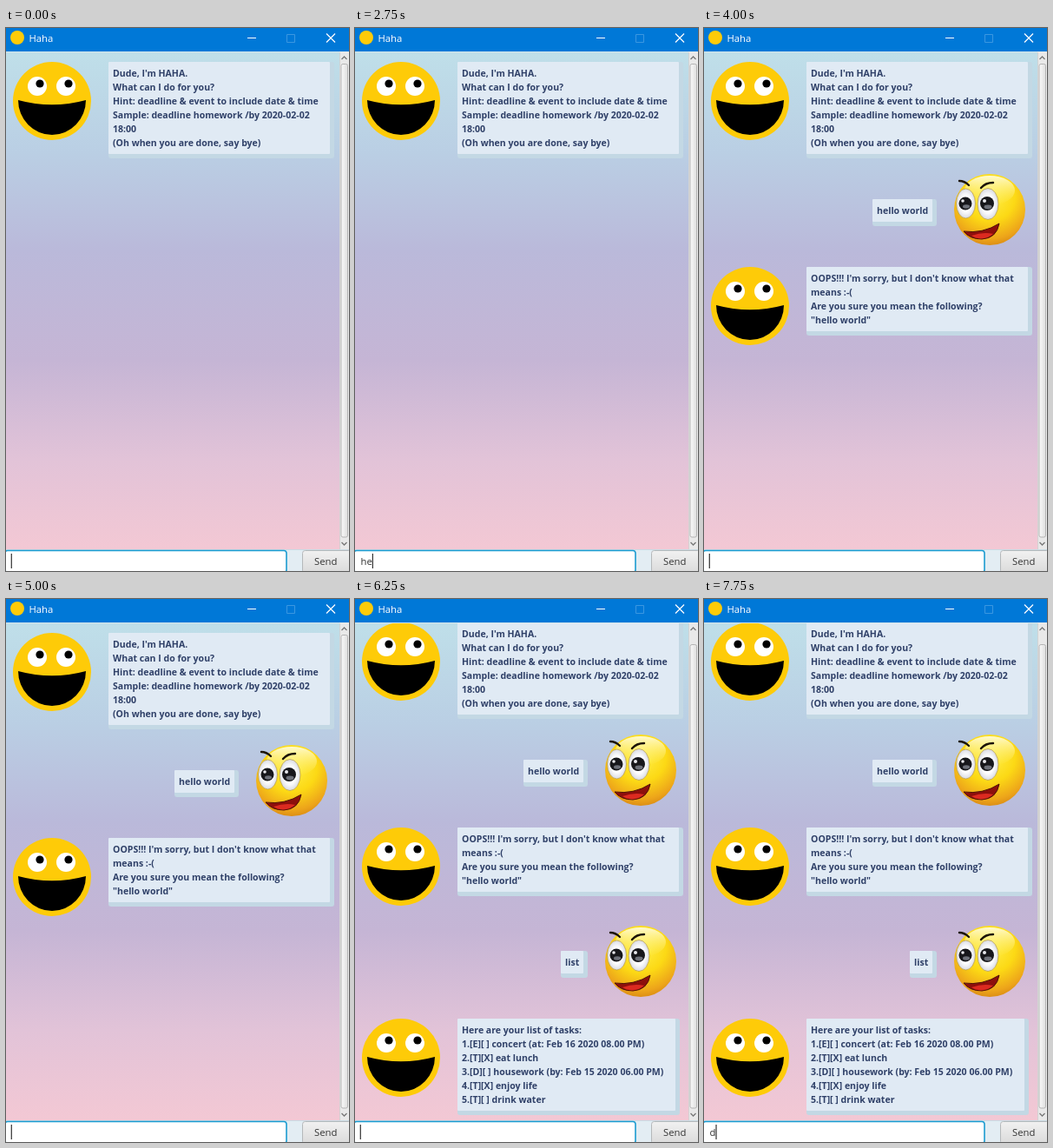
Write an HTML page that moves like this. It is 395 px wide and 625 px high and loops after 8 s.

```html
<!DOCTYPE html>
<html lang="en">
<head>
<meta charset="utf-8">
<title>Haha</title>
<style>
  html, body { margin: 0; width: 100%; height: 100%; overflow: hidden; }
  svg { display: block; width: 395px; height: 625px; }
  text { font: 11.3px "Open Sans", "Noto Sans", sans-serif; white-space: pre; }
  .msg text { font-size: 10.55px; font-weight: 700; fill: #2f4068; }
</style>
</head>
<body>
<svg viewBox="0 0 395 625" xmlns="http://www.w3.org/2000/svg">
  <defs>
    <linearGradient id="sky" x2="0" y2="1">
      <stop offset="0" stop-color="#bfdfe9"/>
      <stop offset=".2" stop-color="#bacfe4"/>
      <stop offset=".4" stop-color="#bab9da"/>
      <stop offset=".62" stop-color="#c5b5d5"/>
      <stop offset=".82" stop-color="#e2c3d8"/>
      <stop offset="1" stop-color="#f3c8d4"/>
    </linearGradient>
    <linearGradient id="button" x2="0" y2="1">
      <stop offset="0" stop-color="#f1f1f1"/>
      <stop offset="1" stop-color="#dadada"/>
    </linearGradient>
    <linearGradient id="bar">
      <stop offset="0" stop-color="#fafafa"/>
      <stop offset="1" stop-color="#dedede"/>
    </linearGradient>
    <radialGradient id="ball" cx=".5" cy=".3" r=".72">
      <stop offset="0" stop-color="#fff04a"/>
      <stop offset=".5" stop-color="#fcd915"/>
      <stop offset=".85" stop-color="#eda51a"/>
      <stop offset="1" stop-color="#d98a14"/>
    </radialGradient>
    <linearGradient id="gloss" x2="0" y2="1">
      <stop offset="0" stop-color="#fffde0" stop-opacity=".9"/>
      <stop offset="1" stop-color="#fff27a" stop-opacity="0"/>
    </linearGradient>
    <radialGradient id="eye">
      <stop offset=".55" stop-color="#fff"/>
      <stop offset="1" stop-color="#d9dbe4"/>
    </radialGradient>
    <clipPath id="view"><path d="M0 28H384V600H0Z"/></clipPath>

    <g id="bot">
      <circle r="45" fill="#fecb08"/>
      <circle cx="-17" cy="-17" r="11" fill="#fff"/>
      <circle cx="16" cy="-17" r="11" fill="#fff"/>
      <circle cx="-14" cy="-20" r="4.6"/>
      <circle cx="19" cy="-20" r="4.6"/>
      <path d="M-39-1Q0 9.5 39-1A39 40 0 0 1-39-1Z"/>
    </g>

    <g id="user">
      <circle r="41" fill="url(#ball)"/>
      <ellipse cy="-22" rx="29" ry="17" fill="url(#gloss)"/>
      <g fill="url(#eye)" stroke="#b99a3a" stroke-width=".7">
        <ellipse cx="-27.500" cy="-7" rx="11" ry="17"/>
        <ellipse cx="-2" cy="-6.500" rx="12" ry="18"/>
      </g>
      <circle cx="-28" cy="-7" r="7.500" fill="#17171b"/>
      <circle cx="-3" cy="-7" r="8" fill="#17171b"/>
      <g fill="#6d7079">
        <ellipse cx="-27" cy="-3.500" rx="4" ry="2.200"/>
        <ellipse cx="-2" cy="-3" rx="4.500" ry="2.400"/>
      </g>
      <circle cx="-31" cy="-10" r="1.800" fill="#e8e8ec"/>
      <circle cx="-6" cy="-10" r="2" fill="#e8e8ec"/>
      <g fill="none" stroke="#1c1408" stroke-width="2.400" stroke-linecap="round">
        <path d="M-35-33Q-29-33-24-28"/>
        <path d="M-10-25Q-5-31 4-31"/>
      </g>
      <path d="M-30 25Q-8 28 11 16Q8 33-9 34Q-23 34-30 25Z" fill="#8d0f0c" stroke="#4e1206"/>
      <path d="M-21 30Q-7 25 4 28Q-2 33-10 33.500Q-17 33-21 30Z" fill="#dc2a20"/>
    </g>
  </defs>

  <rect width="395" height="625" fill="#e3edf3"/>
  <rect y="27" width="384" height="573" fill="url(#sky)"/>
  <path d="M0 27.500H395" stroke="#d3e3ec"/>
  <g clip-path="url(#view)"><g id="chat"></g></g>

  <rect x="384" y="27" width="11" height="573" fill="#e9e9e9"/>
  <path d="M384.500 28V600" stroke="#d3d3d3"/>
  <path d="M386.500 36l3-3 3 3M386.500 592l3 3 3-3" fill="none" stroke="#777" stroke-width="1.300"/>
  <rect id="thumb" x="386" width="7.500" rx="2" fill="url(#bar)" stroke="#b4b4b4"/>

  <rect width="395" height="27" fill="#0078d7"/>
  <circle cx="13" cy="11" r="8" fill="#fecb08"/>
  <text x="26.500" y="16" fill="#fff">Haha</text>
  <g fill="none" stroke="#fff">
    <path d="M278 11.500h10"/>
    <path d="M323.500 7.500h9v9h-9z" stroke="#3a97e1"/>
    <path d="M369 6.500l10 10m0-10l-10 10" stroke-width="1.200"/>
  </g>

  <path d="M0 600.500H395" stroke="#c9dbe4"/>
  <rect x="-1" y="601.500" width="324" height="25" rx="3" fill="#fff" stroke="#1b9bd0" stroke-width="1.600"/>
  <text id="field" x="6.500" y="618" fill="#333" xml:space="preserve"></text>
  <rect id="caret" y="605" width="1.200" height="17" fill="#333"/>
  <rect x="341.500" y="601.500" width="56" height="26" rx="3" fill="url(#button)" stroke="#b5b8ba"/>
  <text x="355" y="618" fill="#333">Send</text>
</svg>

<script>
const LOOP = 8000, STEP = 250;
const $ = id => document.getElementById(id);

const bubble = (x, y, w, h, lines) => `
  <rect x="${x}" y="${y}" width="${w + 5}" height="${h + 5}" rx="3" fill="#c3d8e4"/>
  <rect x="${x}" y="${y}" width="${w}" height="${h}" rx="1" fill="#e0eaf4"/>` +
  lines.map((s, i) => `<text x="${x + 5}" y="${y + 17 + 16 * i}">${s}</text>`).join("");

const botSays = (y, w, h, ...lines) =>
  `<use href="#bot" x="53" y="${y + 45}"/>` + bubble(118, y, w, h, lines);

const userSays = (y, w, line) =>
  `<use href="#user" x="329" y="${y + 12}"/>` + bubble(263 - w, y, w, 26, [line]);

const rounds = [
  botSays(39, 255, 106, "Dude, I'm HAHA.", "What can I do for you?",
    "Hint: deadline &amp; event to include date &amp; time",
    "Sample: deadline homework /by 2020-02-02", "18:00",
    "(Oh when you are done, say bye)"),
  userSays(197, 69, "hello world") +
  botSays(275, 255, 74, "OOPS!!! I'm sorry, but I don't know what that", "means :-(",
    "Are you sure you mean the following?", '"hello world"'),
  userSays(417, 26, "list") +
  botSays(495, 251, 106, "Here are your list of tasks:",
    "1.[E][ ] concert (at: Feb 16 2020 08.PM)".replace("08.", "08.00 "),
    "2.[T][X] eat lunch", "3.[D][ ] housework (by: Feb 15 2020 06.00 PM)",
    "4.[T][X] enjoy life", "5.[T][ ] drink water")
];
$("chat").innerHTML = rounds.map(r => `<g class="msg">${r}</g>`).join("");
const groups = [...document.querySelectorAll(".msg")];

// Each run: start time, then the field's content at every step
const typing = [
  [0, ""],
  [500, "he", "hell", "hello", "hellow", "hellow ", "hellow w", "hellow wo", "hellow wor",
    "hellow", "he", "hell", "hello", "hello wo", "hello worl"],
  [4000, ""],
  [5500, "l", "lis", "list"],
  [6250, ""],
  [7750, "d"]
];
const caretOff = [[4500, 5000], [6750, 7250]];

function draw(t) {
  const [start, ...texts] = typing.findLast(run => run[0] <= t);
  const field = $("field");
  field.textContent = texts[Math.min(Math.floor((t - start) / STEP), texts.length - 1)];
  const end = field.textContent ? field.getComputedTextLength() : -0.8;
  $("caret").setAttribute("x", 6.5 + end);
  $("caret").style.display = caretOff.some(([a, b]) => t >= a && t < b) ? "none" : "";

  const shown = t < 4000 ? 1 : t < 6250 ? 2 : 3;
  groups.forEach((g, i) => g.style.display = i < shown ? "" : "none");
  const scroll = shown > 2 ? 12 : 0;
  $("chat").setAttribute("transform", `translate(0 ${-scroll})`);
  const top = scroll ? 52.5 : 41.5;
  $("thumb").setAttribute("y", top);
  $("thumb").setAttribute("height", 586 - top);
}

let last = -1;
function tick() {
  const t = performance.now() % LOOP;
  const step = Math.floor(t / STEP);
  if (step !== last) draw(step * STEP);
  last = step;
  requestAnimationFrame(tick);
}
tick();
</script>
</body>
</html>
```
